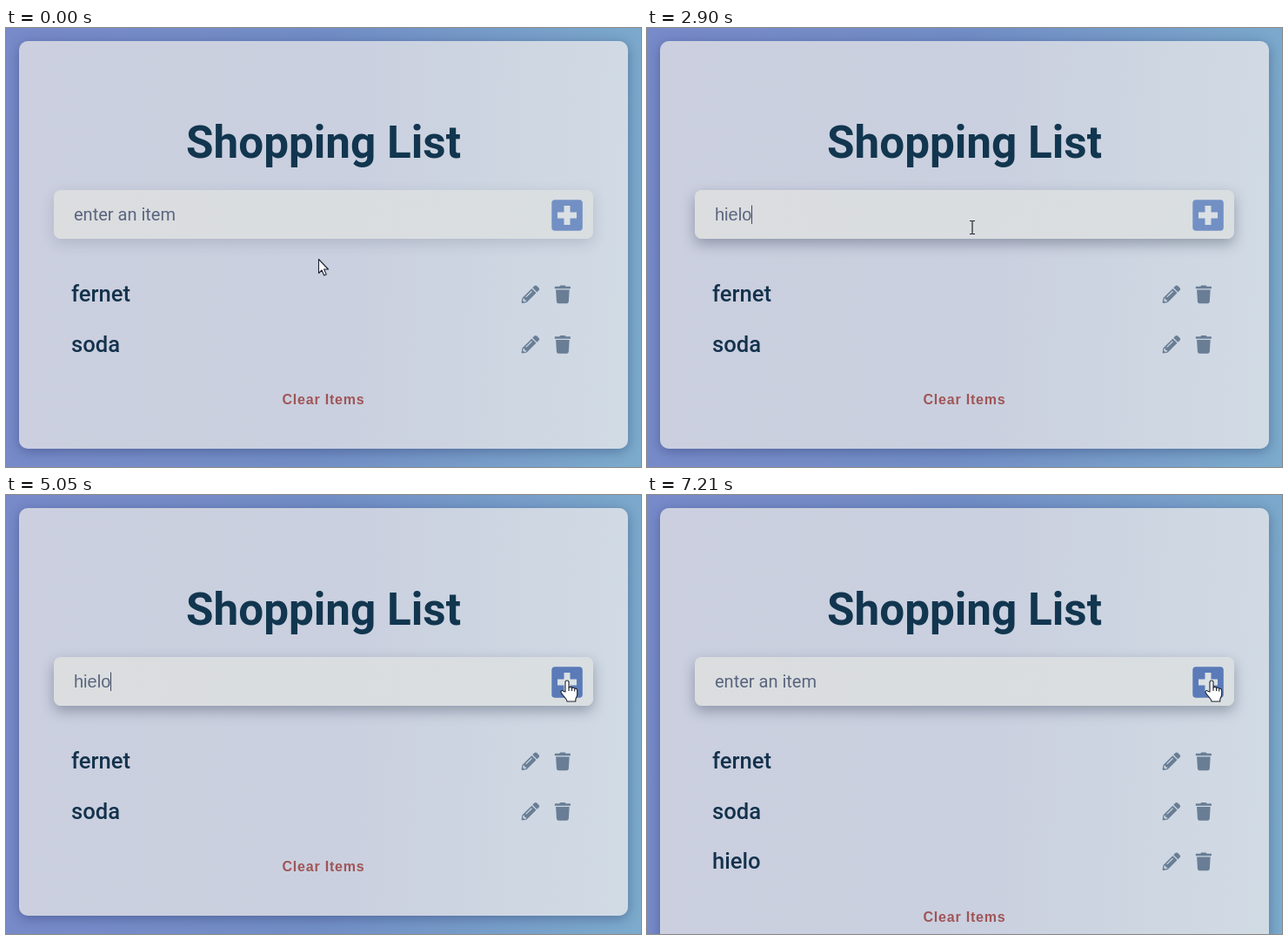
An HTML page for the animation above (7.23 s loop, 730 by 504 pixels).

```html
<!DOCTYPE html>
<html lang="en">
<head>
<meta charset="utf-8">
<title>Shopping List</title>
<style>
  html, body { margin: 0; width: 100%; height: 100%; overflow: hidden; }
  body { position: relative; background: linear-gradient(93deg, #788ac9, #728ec6 50%, #7cabcc); }
  #card, #form, svg { position: absolute; }
  #card {
    left: 15px; top: 15px; width: 700px; border-radius: 10px;
    background: linear-gradient(93deg, #cbcfdf, #cad0df 55%, #d1dbe4);
    box-shadow: 0 3px 14px rgba(25, 40, 90, .38);
  }
  #form {
    left: 55px; top: 186px; width: 620px; height: 56px; border-radius: 8px;
    background: linear-gradient(90deg, #dbdddf, #d9dee1);
  }
  svg { left: 0; top: 0; }
  text { font-family: Roboto, sans-serif; }
  .title { font-size: 51.2px; font-weight: 700; fill: #12364f; text-anchor: middle; }
  .item { font-size: 25.6px; font-weight: 500; fill: #14324c; }
  .icons { fill: #697e95; }
  #field { font-size: 20px; fill: #5a657f; }
  #field.typed { font-family: "Liberation Sans", Arial, sans-serif; }
  #notice { font-size: 16px; font-weight: 700; letter-spacing: .5px; fill: #45825a; text-anchor: middle; }
  #clear { font: 700 16px "Liberation Sans", Arial, sans-serif; letter-spacing: .8px; fill: #a05557; text-anchor: middle; }
  .pointer { fill: #fff; stroke: #1c2230; stroke-width: 1.1; stroke-linejoin: round; }
</style>
</head>
<body>
<div id="card"></div>
<div id="form"></div>
<svg width="730" height="504">
  <defs>
    <g id="icons" class="icons">
      <path transform="translate(592.6 295.4) scale(.0402)" d="M497.9 142.1l-46.1 46.1c-4.7 4.7-12.3 4.7-17 0l-111-111c-4.7-4.7-4.7-12.3 0-17l46.1-46.1c18.7-18.7 49.1-18.7 67.9 0l60.1 60.1c18.8 18.7 18.8 49.1 0 67.9zM284.2 99.8L21.6 362.4.4 483.9c-2.9 16.4 11.4 30.6 27.8 27.8l121.5-21.3 262.6-262.6c4.7-4.7 4.7-12.3 0-17l-111-111c-4.8-4.7-12.4-4.7-17.1 0zM124 340c-5-6-5-14 0-20l154-154c6-5 14-5 20 0s5 14 0 20l-154 154c-6 5-14 5-20 0zM88 424h48v36l-64 11-31-31 11-64h36z" fill-rule="evenodd"/>
      <path transform="translate(630.8 295.4) scale(.0406)" d="M432 32H312l-9-19a24 24 0 0 0-22-13H167a24 24 0 0 0-22 13l-9 19H16A16 16 0 0 0 0 48v32a16 16 0 0 0 16 16h416a16 16 0 0 0 16-16V48a16 16 0 0 0-16-16zM53 467a48 48 0 0 0 48 45h246a48 48 0 0 0 48-45l21-339H32z"/>
    </g>
  </defs>
  <text class="title" x="365" y="148.5">Shopping List</text>
  <text id="notice" x="365.3" y="75.5">Item added</text>
  <text id="field" x="78" y="221"></text>
  <path id="caret" d="M0 203.5V225" stroke="#3c465c"/>
  <rect id="plus" x="627.3" y="197.2" width="35.5" height="35.5" rx="3.8"/>
  <path d="M645 204v22M634 215h22" stroke="#dae0e4" stroke-width="7"/>
  <g id="list"></g>
  <text id="clear" x="365" y="432">Clear Items</text>
  <path id="arrow" class="pointer" d="M.5.5V16.5L4 13l2.7 6 2.5-1.1L6.6 12h4.9z"/>
  <path id="beam" d="M-3-7.5H-1L0-7 1-7.5H3M0-7V7M-3 7.5H-1L0 7 1 7.5H3" fill="none" stroke="#20242c" stroke-width="1.2"/>
  <g id="hand" class="pointer">
    <path d="M-2 13V2a2 2 0 0 1 4 0V8c1-1 3-.8 3.5.5 1-.6 2.8-.4 3.2.8 1.4-.5 3 .2 3 2V16c0 3-1.9 4-1.9 6V24H0C0 21-5 18-7 13.5-7.5 12-5.8 10.7-4.2 12.2z"/>
    <path d="M2 8v4M5.5 8.5V12M8.7 9.5V12.5" fill="none"/>
  </g>
</svg>
<script>
const LOOP = 7230, FOCUS = 700, TYPE = 1640, KEY = 250, ADD = 5400, HIDE = 6900;
const WORD = 'hielo', ENTER = 520, REACH = 4730;
// pointer stops: time, x, y
const PATH = [[0, 359, 265], [300, 359, 265], [640, 374, 229], [4100, 374, 229],
  [4450, 549, 236], [4800, 645, 213], [5150, 645, 213], [5350, 649, 213], [LOOP, 649, 213]];
const $ = id => document.getElementById(id);
const show = (id, on) => $(id).style.display = on ? '' : 'none';
const mix = (a, b, k) => a + (b - a) * k;
const ramp = (t, start, span) => Math.min(1, Math.max(0, (t - start) / span));

$('list').innerHTML = ['fernet', 'soda', WORD].map((name, i) =>
  `<g id="row${i}" transform="translate(0 ${i * 57.5})">
    <text class="item" x="75" y="314">${name}</text><use href="#icons"/></g>`).join('');

function pointer(t) {
  const i = PATH.findIndex(p => p[0] > t), a = PATH[i - 1], b = PATH[i];
  const k = (t - a[0]) / (b[0] - a[0]);
  return [mix(a[1], b[1], k), mix(a[2], b[2], k)];
}

function draw(t) {
  const added = t >= ADD;
  const typed = added ? '' : WORD.slice(0, Math.max(0, Math.floor((t - TYPE) / KEY) + 1));
  const field = $('field');
  field.textContent = typed || 'enter an item';
  field.classList.toggle('typed', typed !== '');

  // each key press restarts the caret blink
  const lastKey = typed ? TYPE + (typed.length - 1) * KEY : FOCUS;
  show('caret', t >= FOCUS && !added && (t - lastKey) % 1000 < 500);
  const caretX = typed ? 78 + field.getComputedTextLength() : 78;
  $('caret').setAttribute('transform', `translate(${Math.floor(caretX) + .5})`);

  const [x, y] = pointer(t);
  const shape = t < ENTER ? 'arrow' : t < REACH ? 'beam' : 'hand';
  for (const id of ['arrow', 'beam', 'hand']) show(id, id === shape);
  $(shape).setAttribute('transform', `translate(${x} ${y})`);

  const glow = ramp(t, ENTER, 300), hover = ramp(t, REACH, 200);
  $('form').style.boxShadow = `0 ${mix(5, 6, glow)}px ${mix(16, 15, glow)}px rgba(40, 50, 75, ${mix(.16, .36, glow)})`;
  $('plus').setAttribute('fill', `rgb(${mix(114, 90, hover)}, ${mix(144, 122, hover)}, ${mix(196, 184, hover)})`);

  show('row2', added);
  show('notice', added && t < HIDE);
  $('card').style.height = (added ? 525 : 467.5) + 'px';
  $('clear').setAttribute('y', added ? 490 : 432);
}

(function tick() {
  draw(performance.now() % LOOP);
  requestAnimationFrame(tick);
})();
</script>
</body>
</html>
```
